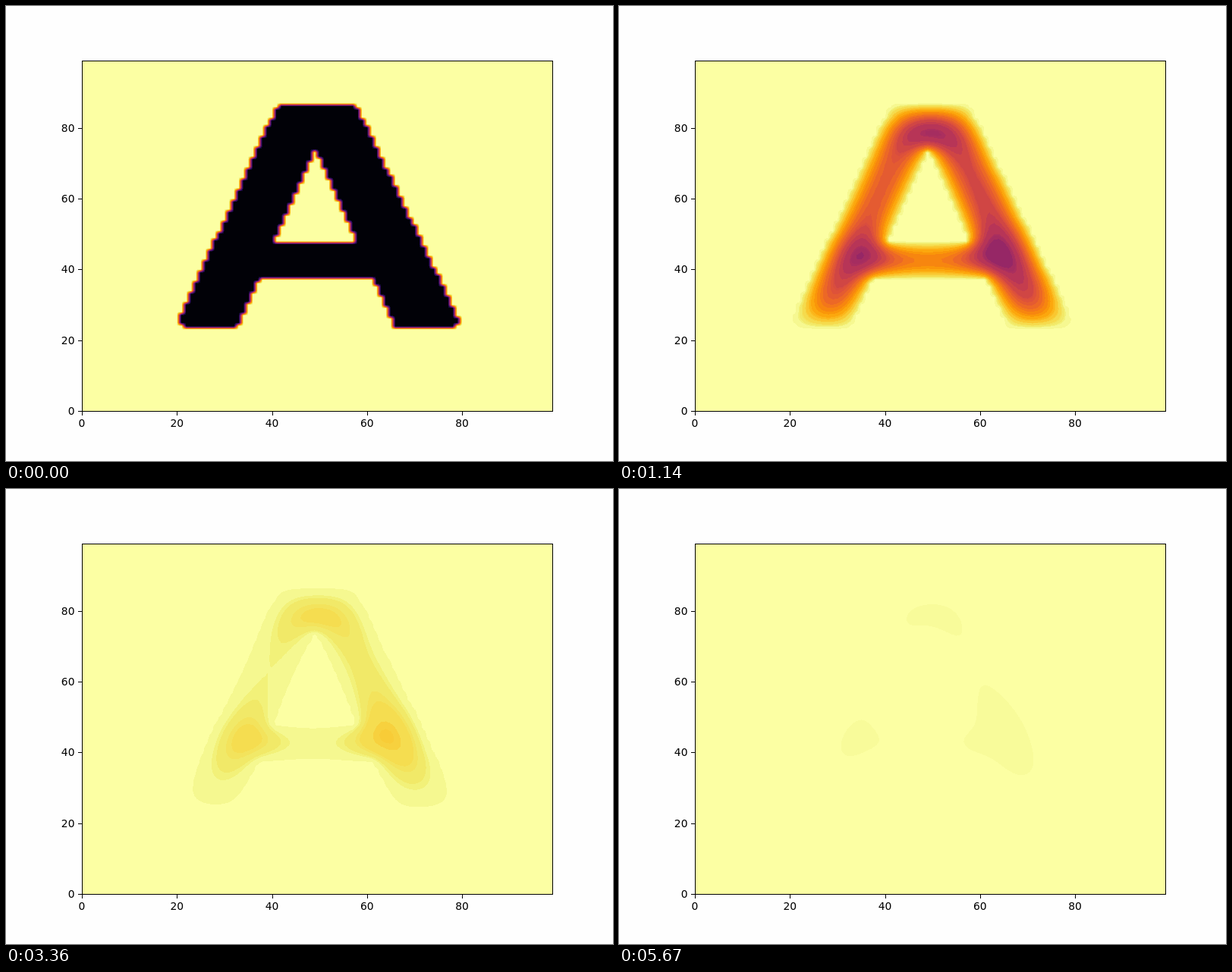
An HTML page with a canvas that plays this animation: 800 px wide and 600 px high, repeating every 8 s.

```html
<!DOCTYPE html>
<html lang="en">
<head>
<meta charset="utf-8">
<title>Heat diffusion in a letter</title>
<style>
html, body { margin: 0; height: 100%; overflow: hidden; background: #fefefe; }
canvas { display: block; }
</style>
</head>
<body>
<canvas id="stage" width="800" height="600"></canvas>
<script>
const LOOP = 8000, FRAME = 30, STEPS = 2, GAMMA = 0.25;
const N = 100, LEVELS = 100;
const LEFT = 100, TOP = 72, W = 620, H = 462;
const SX = W / (N - 1), SY = H / (N - 1);
const ctx = document.getElementById('stage').getContext('2d');

// Inferno colour map: even stops up to 0.95, closer ones at the bright end
const stops = ('000004 08051d 160b39 2b0b57 420a68 56106e 6a176e 7f1e6c 932667 a82e5f ' +
  'bc3754 cc4248 dd513a ea632a f37819 f98e09 fca50a fbbe23 f6d746 f1ec6d f2f482 f6fa96 fcffa4')
  .split(' ').map((hex, i) => ({
    pos: i < 20 ? i * 12.75 : [246, 251, 255][i - 20],
    rgb: [0, 2, 4].map(k => parseInt(hex.substr(k, 2), 16))
  }));

function inferno(v) {
  const pos = Math.min(255, v * 256);
  let i = 1;
  while (stops[i].pos < pos) i++;
  const a = stops[i - 1], b = stops[i], f = (pos - a.pos) / (b.pos - a.pos);
  return a.rgb.map((c, k) => Math.round(c + (b.rgb[k] - c) * f));
}

const colours = Array.from({ length: LEVELS }, (_, i) => inferno((i + 0.5) / LEVELS));
const buckets = colours.map(([r, g, b]) => (r >> 5) * 128 + (g >> 4) * 8 + (b >> 5));

// The letter A on the grid, y pointing up
function inLetter(x, y) {
  if (y < 24 || y > 86) return false;
  if (y === 24 && (x < 22 || x > 78)) return false;
  if (x < 20.5 + (y - 26.3) * 0.3445 || x > 58.4 + (84.6 - y) * 0.357) return false;
  if (y < 38) return x <= 33.4 + (y - 25.5) * 0.33 || x >= 61.5 + (37 - y) * 0.34;
  if (y > 47 && y < 74) return x < 48.45 - (72 - y) * 0.335 || x > 50.5 + (70 - y) * 0.333;
  return true;
}

const cells = [];
for (let y = 0; y < N; y++)
  for (let x = 0; x < N; x++)
    if (inLetter(x, y)) cells.push(y * N + x);

let heat, next, done;
function reset() {
  heat = new Float64Array(N * N).fill(1);
  for (const c of cells) heat[c] = 0;
  next = heat.slice();
  done = 0;
}

// Everything outside the letter stays hot
function diffuse() {
  for (const c of cells) {
    const sum = heat[c - 1] + heat[c + 1] + heat[c - N] + heat[c + N];
    next[c] = heat[c] + GAMMA * (sum - 4 * heat[c]);
  }
  [heat, next] = [next, heat];
}

const image = ctx.createImageData(W, H);
const levelAt = new Uint8Array(W * H);

function paintHeat() {
  const counts = new Array(LEVELS).fill(0);
  for (let py = 0, p = 0; py < H; py++) {
    const gy = (H - py - 0.5) / SY, y = Math.floor(gy), fy = gy - y;
    for (let px = 0; px < W; px++, p++) {
      const gx = (px + 0.5) / SX, x = Math.floor(gx), fx = gx - x, c = y * N + x;
      const low = heat[c] + (heat[c + 1] - heat[c]) * fx;
      const high = heat[c + N] + (heat[c + N + 1] - heat[c + N]) * fx;
      const level = Math.min(LEVELS - 1, Math.floor((low + (high - low) * fy) * LEVELS));
      levelAt[p] = level;
      counts[level]++;
    }
  }

  // Levels of nearly equal colour share their mean; black also counts lines and labels
  const sums = { 0: [0, 0, 0, 3000] };
  colours.forEach((rgb, i) => {
    const sum = sums[buckets[i]] ||= [0, 0, 0, 0];
    rgb.forEach((v, k) => sum[k] += v * counts[i]);
    sum[3] += counts[i];
  });
  const palette = buckets.map(b => sums[b].slice(0, 3).map(v => Math.round(v / (sums[b][3] || 1))));

  for (let p = 0; p < W * H; p++) {
    const rgb = palette[levelAt[p]], o = p * 4;
    image.data[o] = rgb[0];
    image.data[o + 1] = rgb[1];
    image.data[o + 2] = rgb[2];
    image.data[o + 3] = 255;
  }
  ctx.putImageData(image, LEFT, TOP);
}

function paintAxes() {
  const bottom = TOP + H;
  ctx.strokeStyle = ctx.fillStyle = '#000';
  ctx.lineWidth = 1;
  ctx.strokeRect(LEFT + 0.5, TOP + 0.5, W, H);
  ctx.font = '13.89px "DejaVu Sans", sans-serif';
  for (let v = 0; v <= 80; v += 20) {
    const x = LEFT + v * SX, y = bottom - v * SY;
    ctx.fillRect(Math.round(x), bottom + 1, 1, 5);
    ctx.fillRect(LEFT - 5, Math.round(y), 5, 1);
    ctx.textAlign = 'center';
    ctx.fillText(v, x, bottom + 21);
    ctx.textAlign = 'right';
    ctx.fillText(v, LEFT - 9.5, Math.round(y) + 5);
  }
}

let shown = -1;
function tick() {
  const frame = Math.floor(performance.now() % LOOP / FRAME);
  if (frame !== shown) {
    if (frame < shown) reset();
    for (; done < frame * STEPS; done++) diffuse();
    ctx.fillStyle = '#fefefe';
    ctx.fillRect(0, 0, 800, 600);
    paintHeat();
    paintAxes();
    shown = frame;
  }
  requestAnimationFrame(tick);
}

reset();
tick();
</script>
</body>
</html>
```
